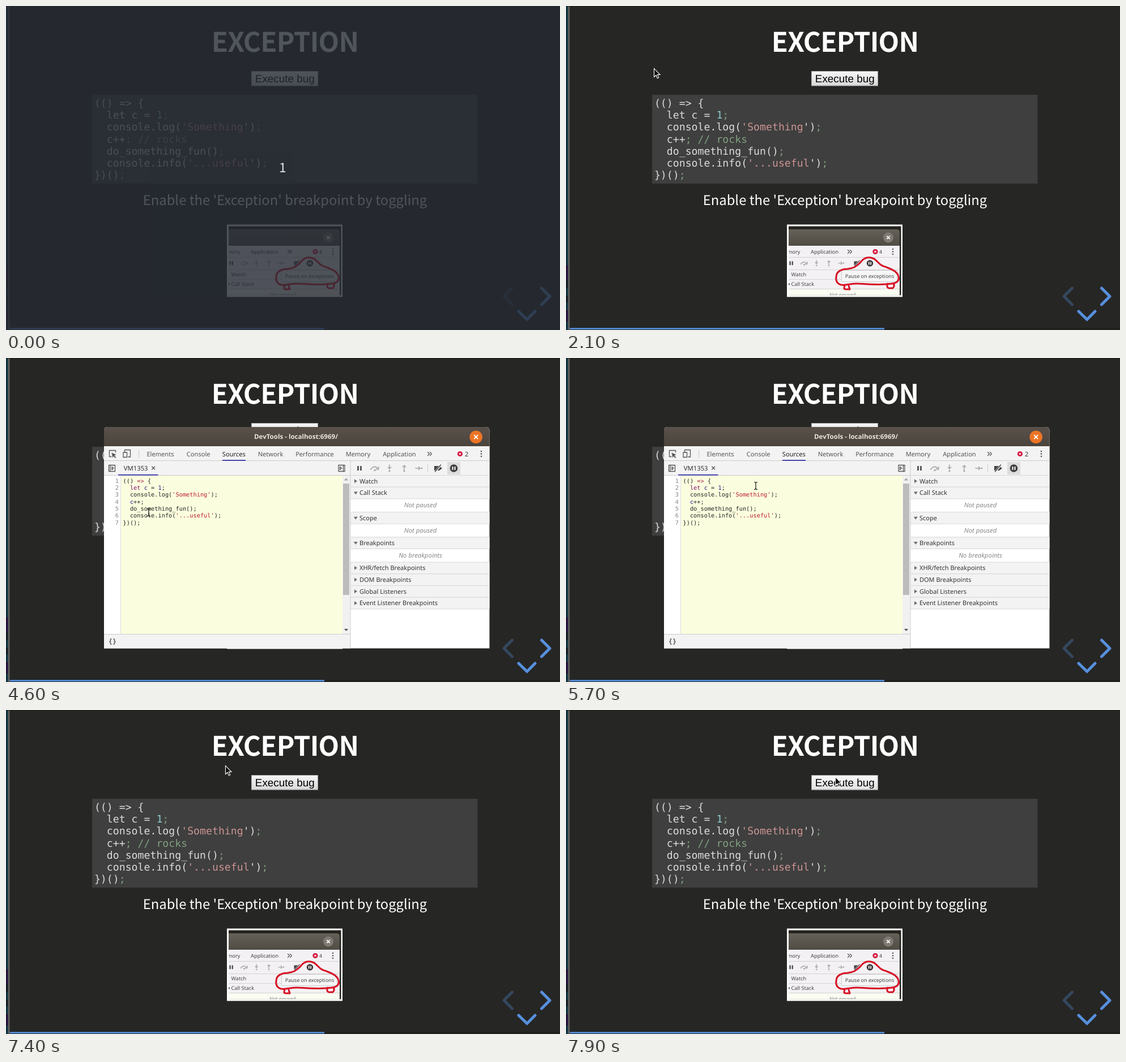
Write an HTML page that moves like this. It is 978 px wide and 573 px high and loops after 8000 ms.

```html
<!DOCTYPE html>
<html lang="en">
<head>
<meta charset="utf-8">
<title>Exception breakpoint</title>
<style>
html, body { margin: 0; width: 100%; height: 100%; overflow: hidden; background: #262624; }
svg { display: block; width: 978px; height: 573px; }
text { text-rendering: geometricPrecision; }
.slide { font-family: "Noto Sans CJK JP", "Noto Sans CJK SC", "Noto Sans CJK", sans-serif; fill: #fff; }
.ui { font-family: "Noto Sans", "Open Sans", sans-serif; }
.mono { font-family: "DejaVu Sans Mono", monospace; }
.mid { text-anchor: middle; }
.line { fill: none; stroke-linecap: round; stroke-linejoin: round; }

.code { font-size: 18.19px; fill: #dcdcdc; }
.code .s { fill: #cc9393; }
.code .n { fill: #8cd0d3; }
.code .c { fill: #7f9f7f; }

.src { font-size: 10.3px; fill: #222; }
.src .k { fill: #7a0a6e; }
.src .o { fill: #a02040; }
.src .v { fill: #1c1c90; }
.src .s { fill: #b81a2c; }

#count, #tools, #hover, #arrow, #beam { animation: 8s step-end infinite; }
#count { animation-name: count; }
#tools { animation-name: tools; }
#hover { animation-name: hover; }
#arrow { animation-name: arrow; }
#beam { animation-name: beam; }

@keyframes count { 0% { opacity: 1 } 6.25%, 100% { opacity: 0 } }
@keyframes tools { 0% { opacity: 0 } 57.5% { opacity: 1 } 92.5%, 100% { opacity: 0 } }
@keyframes hover { 0% { opacity: 0 } 97.5%, 100% { opacity: 1 } }
@keyframes arrow {
  0% { opacity: 0; transform: translate(155px, 110px) }
  26.25% { opacity: 1; transform: translate(155px, 110px) }
  27.5% { opacity: 1; transform: translate(183px, 147px) }
  28.75% { opacity: 1; transform: translate(211px, 186px) }
  30% { opacity: 1; transform: translate(229px, 211px) }
  32.5% { opacity: 1; transform: translate(251px, 270px) }
  57.5% { opacity: 0; transform: translate(251px, 270px) }
  73.75% { opacity: 1; transform: translate(405px, 178px) }
  75% { opacity: 1; transform: translate(416px, 156px) }
  76.25% { opacity: 1; transform: translate(402px, 138px) }
  77.5% { opacity: 1; transform: translate(387px, 130px) }
  80% { opacity: 1; transform: translate(387px, 113px) }
  81.25% { opacity: 1; transform: translate(387px, 98px) }
  96.25% { opacity: 1; transform: translate(415px, 104px) }
  97.5% { opacity: 1; transform: translate(452px, 113px) }
  98.75%, 100% { opacity: 1; transform: translate(475px, 118px) }
}
@keyframes beam {
  0% { opacity: 0; transform: translate(252px, 273px) }
  57.5% { opacity: 1; transform: translate(252px, 273px) }
  68.75% { opacity: 1; transform: translate(263px, 264px) }
  70% { opacity: 1; transform: translate(295px, 246px) }
  71.25% { opacity: 1; transform: translate(335px, 226px) }
  72.5% { opacity: 1; transform: translate(375px, 209px) }
  73.75%, 100% { opacity: 0; transform: translate(375px, 209px) }
}
</style>
</head>
<body>
<svg viewBox="0 0 978 573" xmlns="http://www.w3.org/2000/svg">
  <defs>
    <linearGradient id="btn" x2="0" y2="1"><stop stop-color="#f6f6f6"/><stop offset="1" stop-color="#d9d9d9"/></linearGradient>
    <linearGradient id="btnHot" x2="0" y2="1"><stop stop-color="#f9f9f9"/><stop offset="1" stop-color="#e2e2e2"/></linearGradient>
    <linearGradient id="bar" x2="0" y2="1"><stop stop-color="#59514a"/><stop offset="1" stop-color="#4b443d"/></linearGradient>
    <linearGradient id="shotBar" x2="0" y2="1"><stop stop-color="#656159"/><stop offset="1" stop-color="#504c45"/></linearGradient>
    <clipPath id="shotClip"><path d="M393 389.500H591.500V511.500H393z"/></clipPath>

    <g id="debugIcons" class="line" stroke="#a8a8a8" stroke-width="1.700">
      <path d="M621.500 191v8M626.500 191v8" stroke="#444" stroke-width="2.600" stroke-linecap="butt"/>
      <path d="M644 197q6.500-9 13-.5M657.500 192.500v4.500h-4.500"/>
      <path d="M677 189v6M674.500 193.500l2.500 2.500 2.500-2.500"/>
      <path d="M703 197v-6M700.500 192.500l2.500-2.500 2.500 2.500"/>
      <path d="M723 195h8M728.500 192.500l2.500 2.500-2.500 2.500"/>
      <g fill="#a8a8a8" stroke="none"><circle cx="651" cy="198.500" r="1.700"/><circle cx="677" cy="199.800" r="1.700"/><circle cx="703" cy="199.800" r="1.700"/><circle cx="734" cy="195" r="1.500"/></g>
      <path d="M756 191h9l5 4-5 4h-9z" fill="#444" stroke="none"/>
      <path d="M758 201l10-12" stroke="#f3f3f3" stroke-width="3.500"/>
      <path d="M757.500 201l10-12" stroke="#444" stroke-width="1.400"/>
    </g>
    <g id="pause">
      <circle r="6.800" fill="#3c3c3c"/>
      <path d="M-2-3v6M2-3v6" stroke="#fff" stroke-width="2"/>
    </g>
    <g id="error">
      <circle r="4.600" fill="#d5113a"/>
      <path d="M-1.700-1.700l3.400 3.400M1.700-1.700l-3.400 3.400" stroke="#fff" stroke-width="1.200"/>
    </g>
    <g id="dots" fill="#555"><circle cy="-4.500" r="1.300"/><circle r="1.300"/><circle cy="4.500" r="1.300"/></g>
    <path id="more" class="line" d="M-3.500-3l3 3-3 3M.5-3l3 3-3 3" stroke="#555" stroke-width="1.300"/>
  </defs>

  <rect width="978" height="573" fill="#262624"/>
  <g id="edge">
    <rect width="4" height="573" fill="#0e3340"/>
    <path d="M0 458h4v27H0zM0 538h4v20H0z" fill="#24113d"/>
    <path d="M0 485h4v14H0zM0 512h4v12H0z" fill="#141c24"/>
    <rect x="3.500" width="3" height="573" fill="#62625f"/>
    <rect width="978" height="1" fill="#1d1d1c"/>
  </g>

  <g class="slide">
    <text class="mid" x="492.500" y="81.300" font-size="47.600" font-weight="700" letter-spacing="-.8">EXCEPTION</text>
    <text class="mid" x="492.500" y="352" font-size="23.800">Enable the 'Exception' breakpoint by toggling</text>
  </g>

  <rect x="433.500" y="115.500" width="117" height="25.500" fill="url(#btn)" stroke="#a9a9a9"/>
  <rect id="hover" x="433.500" y="115.500" width="117" height="25.500" fill="url(#btnHot)" stroke="#9a9a9a"/>
  <text class="mid" x="492.300" y="135" font-size="18.900" font-family="Liberation Sans, Arial, sans-serif">Execute bug</text>

  <rect x="152" y="157" width="680.500" height="157" fill="#3f3f3f"/>
  <g class="code mono">
    <text x="155.900" y="177.800">(() =&gt; {</text>
    <text x="177.800" y="199.100">let c = <tspan class="n">1</tspan><tspan class="c">;</tspan></text>
    <text x="177.800" y="220.300">console.log(<tspan class="s">'Something</tspan>')<tspan class="c">;</tspan></text>
    <text x="177.800" y="241.600">c++<tspan class="c">; // rocks</tspan></text>
    <text x="177.800" y="262.800">do_something_fun()<tspan class="c">;</tspan></text>
    <text x="177.800" y="284.100">console.info(<tspan class="s">'...useful</tspan>')<tspan class="c">;</tspan></text>
    <text x="155.900" y="305.400">})()<tspan class="c">;</tspan></text>
  </g>

  <g id="shot">
    <rect x="390" y="386.500" width="204" height="128" fill="#fff"/>
    <g clip-path="url(#shotClip)" class="ui" font-size="9.100" fill="#444">
      <rect x="393" y="389" width="199" height="123" fill="#24231f"/>
      <path d="M393 395H584q5 0 5 5V424H393z" fill="url(#shotBar)"/>
      <circle cx="569" cy="409.500" r="9" fill="#7f7b74"/>
      <path d="M566.300 406.800l5.400 5.400M571.700 406.800l-5.400 5.400" stroke="#fff" stroke-width="1.700"/>
      <rect x="393" y="424" width="196" height="88" fill="#f3f1f3"/>
      <path d="M393 444.500H589M393 466.500H589M393 483.500H589M393 500.500H589" stroke="#d4d2d4"/>
      <rect x="393" y="501" width="196" height="12" fill="#fafdf2"/>
      <text x="413.500" y="437.700" text-anchor="end">mory</text>
      <text x="432" y="437.700" font-size="9.300">Application</text>
      <use href="#more" x="501" y="434.500"/>
      <use href="#error" x="546" y="434.500"/>
      <text x="553" y="437.700">4</text>
      <use href="#dots" x="577" y="434.500"/>
      <use href="#debugIcons" transform="translate(-126.500 293) scale(.84 .83)"/>
      <use href="#pause" transform="translate(536.500 455) scale(.85)"/>
      <text x="397.500" y="478.300">Watch</text>
      <text x="397.500" y="495.300">Call Stack</text>
      <path d="M393 490l2.500 2-2.500 2z"/>
      <text class="mid" x="488" y="513.500" font-style="italic" fill="#888">Not paused</text>
      <rect x="486.500" y="467.500" width="98" height="20" rx="2" fill="#f6f6f6" stroke="#ccc"/>
      <text x="492.800" y="480.500" font-size="9">Pause on exceptions</text>
      <g class="line" stroke="#d80f24" stroke-width="3">
        <path d="M477 479C477 470 486 465 497 465C508 464 514 460 520 453C526 445 533 443 541 446C549 448 551 457 560 460C572 464 585 469 587 478C589 486 584 490 575 491C555 494 535 492 516 491C503 490 494 495 485 493C479 491 476 486 477 479z"/>
        <path d="M492 495q-3 6 2 6h7l-2-6M568 491q-3 7 2 8h7q4-4 1-8"/>
      </g>
    </g>
  </g>

  <g class="line" stroke="#5690dc" stroke-width="5">
    <path d="M893.500 499l-14.500 14.500 14.500 14.500" opacity=".32"/>
    <path d="M945.500 499l14.500 14.500-14.500 14.500M905 540l14.700 14.500 14.300-14.500"/>
  </g>
  <rect y="569.500" x="6.500" width="971.500" height="2.500" fill="#1f1f1e"/>
  <rect y="569.300" x="6.500" width="555.500" height="2.700" fill="#5690dc"/>

  <g id="tools" class="ui" font-size="11.100" fill="#333">
    <path d="M173 513.500V128q0-6 6-6H847.500q6 0 6 6V513.500z" fill="#fff"/>
    <path d="M173 156V128q0-6 6-6H847.500q6 0 6 6V156z" fill="url(#bar)"/>
    <text class="mid" x="512" y="143" font-size="11.550" font-weight="700" fill="#e9e4de">DevTools - localhost:6969/</text>
    <circle cx="829.700" cy="139.700" r="11.300" fill="#ec7526"/>
    <path d="M826.200 136.200l7 7M833.200 136.200l-7 7" stroke="#fff" stroke-width="1.900"/>

    <path d="M173 156H853.500V208H173zM173 488H608V513.500H173z" fill="#f3f3f3"/>
    <path d="M173 181.500H853.500M173 207.500H853.500M173 488.500H608M234.500 162v15M744.500 187v15" stroke="#ccc"/>

    <g class="line" stroke="#555" stroke-width="1.300">
      <path d="M186 174.500h-3.500v-11h11v3"/>
      <path d="M187 168l7 3-3 1.200 3 3.500-1.300 1-2.700-3.500-1.500 2.500z" fill="#555" stroke-width=".5"/>
      <path d="M209.500 166v-3.500h10v12.500h-4M207 167h6.500v8.500H207z"/>
      <path d="M181.500 189.500h11v11h-11zM184 189.500v11M187 192.500v5l3-2.500z"/>
      <path d="M587 189.500h11v11h-11zM595.500 189.500v11M589.500 192.500v5l3-2.500z"/>
      <path d="M257.700 192l5 5M262.700 192l-5 5"/>
    </g>
    <g id="tabs" class="mid"></g>
    <path d="M382 181H423M198 206.800H268.500" stroke="#4646ad" stroke-width="2"/>
    <use href="#more" x="748" y="169.500"/>
    <use href="#error" x="801.500" y="169.500"/>
    <text x="810" y="173.500">2</text>
    <use href="#dots" x="839" y="169.500"/>
    <text x="207.700" y="199" font-size="11.300">VM1353</text>

    <rect x="779" y="184" width="23" height="22" fill="#dcdcdc"/>
    <use href="#debugIcons"/>
    <use href="#pause" x="790.500" y="195"/>

    <rect x="203" y="208" width="391" height="280" fill="#fbfede"/>
    <path d="M202.500 208V488" stroke="#ddd"/>
    <rect x="594" y="208" width="13.500" height="280" fill="#f1f1f1"/>
    <rect x="595" y="222" width="11" height="197" fill="#bcbcbc"/>
    <path d="M597 216.500h7l-3.500-4z" fill="#a3a3a3"/>
    <path d="M597 479h7l-3.500 4z" fill="#505050"/>
    <text class="mid mono" x="188" y="505" font-size="11.500" font-weight="700" fill="#555">{}</text>

    <g id="nums" class="mono" font-size="10.300" fill="#888" text-anchor="end"></g>
    <g class="src mono">
      <text x="206.500" y="220.700">(() <tspan class="o">=&gt;</tspan> {</text>
      <text x="218.900" y="233"><tspan class="k">let</tspan> <tspan class="v">c</tspan> = <tspan class="v">1</tspan>;</text>
      <text x="218.900" y="245.300">console.log(<tspan class="s">'Something'</tspan>);</text>
      <text x="218.900" y="257.600"><tspan class="v">c</tspan>++;</text>
      <text x="218.900" y="269.900">do_something_fun();</text>
      <text x="218.900" y="282.200">console.info(<tspan class="s">'...useful'</tspan>);</text>
      <text x="206.500" y="294.500">})();</text>
    </g>

    <g id="panes" font-size="11"></g>
    <path d="M608 182V513.500" stroke="#ccc"/>
  </g>

  <path id="beam" class="line" d="M-2.500-6.500Q0-6.500 0-4.500Q0-6.500 2.500-6.500M0-5V5M-2.500 6.500Q0 6.500 0 4.500Q0 6.500 2.500 6.500" stroke="#111" stroke-width="1.200"/>
  <path id="arrow" d="M.5.5V15.500L4 12.300L6.300 17.700L8.700 16.700L6.400 11.400H11z" fill="#0c0c0c" stroke="#fff" stroke-width="1.100"/>

  <g id="count">
    <rect width="978" height="573" fill="#252a33" fill-opacity=".8"/>
    <text class="slide mid" x="488.300" y="294.300" font-size="23" style="fill:#e2e3e4">1</text>
  </g>
</svg>
<script>
const NS = "http://www.w3.org/2000/svg";

function add(parent, tag, attrs, text = "") {
  const el = document.createElementNS(NS, tag);
  for (const key in attrs) el.setAttribute(key, attrs[key]);
  el.textContent = text;
  document.getElementById(parent).append(el);
}

const tabs = { Elements: 272.5, Console: 339.7, Sources: 402.3, Network: 467, Performance: 545, Memory: 621.5, Application: 694.5 };
for (const name in tabs)
  add("tabs", "text", { x: tabs[name], y: 173.5, fill: name === "Sources" ? "#222" : "#555" }, name);

for (let i = 0; i < 7; i++)
  add("nums", "text", { x: 199, y: 220.7 + 12.3 * i }, i + 1);

// Each pane: heading, and the note shown when it is open.
const panes = [
  ["Watch"], ["Call Stack", "Not paused"], ["Scope", "Not paused"], ["Breakpoints", "No breakpoints"],
  ["XHR/fetch Breakpoints"], ["DOM Breakpoints"], ["Global Listeners"], ["Event Listener Breakpoints"]
];
let y = 207.5;
for (const [head, note] of panes) {
  const mid = y + 10.2;
  add("panes", "rect", { x: 608, y, width: 245.5, height: 20.7, fill: "#f3f3f3" });
  add("panes", "path", { d: `M608 ${y}H853.5M608 ${y + 20.7}H853.5`, stroke: "#d8d8d8" });
  add("panes", "path", {
    d: note ? `M613.8 ${mid - 2}h7l-3.500 5z` : `M615 ${mid - 3.5}v7l5-3.500z`, fill: "#6e6e6e"
  });
  add("panes", "text", { x: 624, y: mid + 4 }, head);
  y += 20.7;
  if (note) {
    add("panes", "text", { class: "mid", x: 731.5, y: y + 15.5, "font-style": "italic", "font-size": 11.3, fill: "#888" }, note);
    y += 23.6;
  }
}
</script>
</body>
</html>
```
